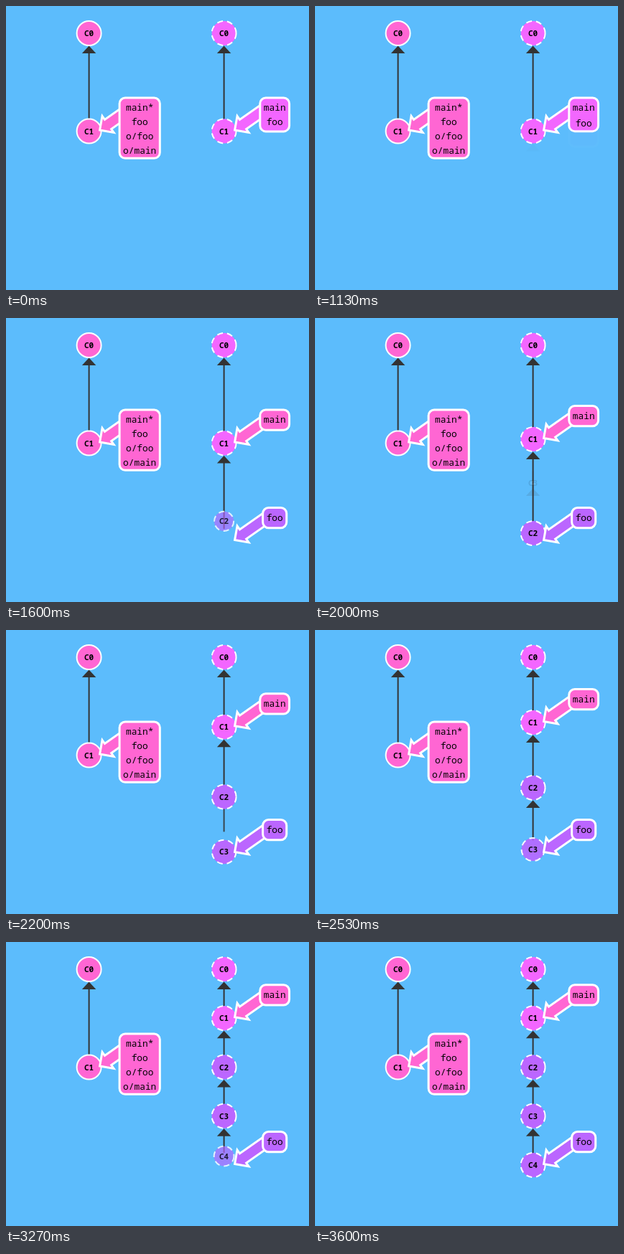
Animation, 422 px wide and 396 px high, one loop 5190 ms. Source, as an HTML page:

```html
<!DOCTYPE html>
<html lang="en">
<head>
<meta charset="utf-8">
<title>Commit tree</title>
<style>
  html, body { margin: 0; width: 100%; height: 100%; overflow: hidden; background: #5cbcfc; }
  svg { display: block; width: 422px; height: 396px; }
  text { font-family: "Noto Sans Mono", "DejaVu Sans Mono", monospace; text-anchor: middle; fill: #000; }
  .id { font-size: 11px; font-weight: bold; }
  .name { font-size: 12.83px; }
  .node { stroke: #fff; stroke-width: 2; }
  .remote { stroke-dasharray: 8 6; }
  .tag { stroke: #fff; stroke-width: 3; }
  .line { stroke: #333; stroke-width: 2; }
  .head { fill: #333; }
</style>
</head>
<body>
<svg id="stage" viewBox="0 0 422 396"></svg>
<script>
const LOOP = 5190, FPS = 15;
const LEFT = 115.6, RIGHT = 303.6, TOP = 38, R = 17;
const PINK = [255, 102, 211], MIX = [243, 102, 255], PURPLE = [187, 102, 255];
// one entry per new commit: start time, and the row gap it leads to
const BORN = [{ at: 1100, gap: 136.5 }, { at: 1904, gap: 91 }, { at: 2754, gap: 68.25 }];
const CHAR = 7.7, PAD = 5, ROW = 18.7, BOX_PAD = 9.5;

const stage = document.getElementById('stage');
const mix = (a, b, p) => a + (b - a) * p;
const clamp = v => Math.max(0, Math.min(1, v));
const rgb = c => `rgb(${c.map(Math.round)})`;
const blend = (a, b, p) => rgb(a.map((v, i) => mix(v, b[i], p)));

function set(el, attrs) {
  for (const key in attrs) el.setAttribute(key, attrs[key]);
  return el;
}
function add(tag, attrs, parent = stage) {
  return parent.appendChild(set(document.createElementNS('http://www.w3.org/2000/svg', tag), attrs));
}
function label(str, cls, x) {
  const el = add('text', { class: cls, x });
  el.textContent = str;
  return el;
}

function easeInOut(n) {
  if (n <= 0 || n >= 1) return clamp(n);
  const q = 0.48 - n / 1.04, w = Math.sqrt(0.1734 + q * q);
  const t = Math.cbrt(w - q) + Math.cbrt(-w - q) + 0.5;
  return 3 * (1 - t) * t * t + t * t * t;
}
function bounce(n) {
  const k = 7.5625, d = 2.75;
  if (n >= 1) return 1;
  if (n < 1 / d) return k * n * n;
  if (n < 2 / d) return k * (n - 1.5 / d) ** 2 + 0.75;
  if (n < 2.5 / d) return k * (n - 2.25 / d) ** 2 + 0.9375;
  return k * (n - 2.625 / d) ** 2 + 0.984375;
}

function makeEdge(x) {
  const g = add('g', {});
  const line = add('line', { class: 'line', x1: x, x2: x }, g);
  const head = add('path', { class: 'head', d: `M${x} -0.5l9.7 10.5h-19.4z` }, g);
  return (top, bottom, opacity) => {
    set(line, { y1: top + 5, y2: bottom });
    set(head, { transform: `translate(0 ${top})` });
    set(g, { opacity });
  };
}

function makeNode(x, str, fill, cls = '') {
  const circle = add('circle', { class: 'node ' + cls, cx: x, fill: rgb(fill) });
  const text = label(str, 'id', x);
  return (y, p) => {
    set(circle, { cy: y, r: R * p, opacity: p, 'fill-opacity': p });
    set(text, { y: y + 4, opacity: p });
  };
}

function makeTag(x) {
  const arrow = add('path', { class: 'tag', d: 'M0 0L14 -14V-8H63V8H14V14Z' });
  const box = add('rect', { class: 'tag', rx: 8, ry: 8 });
  return (commitY, textY, chars, rows, fill, opacity) => {
    const w = chars * CHAR + PAD * 2;
    set(arrow, { transform: `translate(${x + 15} ${commitY - 1.5}) rotate(-35)`, fill, opacity });
    set(box, {
      x: x + 70.6 - w / 2, y: textY - 14.1, width: w, height: rows * ROW + BOX_PAD, fill, opacity
    });
  };
}
const makeName = (x, str) => {
  const el = label(str, 'name', x + 70.6);
  return y => set(el, { y: y + 4.3 });
};

// local tree, which stays still
makeEdge(LEFT)(TOP + 18, 157.5, 1);
makeNode(LEFT, 'C1', PINK)(174.5, 1);
makeNode(LEFT, 'C0', PINK)(TOP, 1);
makeTag(LEFT)(174.5, 142.1, 6, 4, rgb(PINK), 1);
['main*', 'foo', 'o/foo', 'o/main'].forEach((s, i) => makeName(LEFT, s)(142.1 + 20 * i));

// remote tree, younger commits behind their parents
const edges = [4, 3, 2, 1].map(k => ({ k, draw: makeEdge(RIGHT) }));
const nodes = [4, 3, 2, 1, 0].map(k => (
  { k, draw: makeNode(RIGHT, 'C' + k, k < 2 ? MIX : PURPLE, 'remote') }
));
const mainTag = makeTag(RIGHT), mainName = makeName(RIGHT, 'main');
const fooTag = makeTag(RIGHT), fooName = makeName(RIGHT, 'foo');

function draw(t) {
  const ease = BORN.map(b => easeInOut(clamp((t - b.at) / 400)));
  const pop = BORN.map(b => bounce(clamp((t - b.at) / 800)));
  const gap = mix(mix(BORN[0].gap, BORN[1].gap, ease[1]), BORN[2].gap, ease[2]);
  const rowY = k => TOP + k * gap;
  // a newborn leaves its parent's final place
  const birthY = (k, p) => TOP + (k - 1 + p) * BORN[k - 2].gap;
  const fresh = k => k > 1 && pop[k - 2] < 1;

  for (const { k, draw } of edges) {
    if (fresh(k)) {
      const p = ease[k - 2];
      const top = p < 1 ? birthY(k, 0) : rowY(k - 1);
      draw(top + 18, birthY(k, p) - R, p);
    } else {
      draw(rowY(k - 1) + 18, rowY(k) - R, 1);
    }
  }
  for (const { k, draw } of nodes) {
    if (fresh(k)) draw(birthY(k, pop[k - 2]), pop[k - 2]);
    else draw(rowY(k), 1);
  }

  const split = ease[0], rows = 2 - split;
  mainTag(rowY(1), rowY(1) - 32.4, 4, rows, blend(MIX, PINK, split), 1);
  mainName(rowY(1) - 32.4);
  const fooY = mix(162.1, 278.6, split);
  fooTag(mix(174.5, 311, split), fooY, 4 - split, rows, blend(MIX, PURPLE, split), split);
  fooName(fooY);
}

const start = performance.now();
function tick() {
  const t = (performance.now() - start) % LOOP;
  draw(Math.floor((t + 3.4) * FPS / 1000) * 1000 / FPS);
  requestAnimationFrame(tick);
}
tick();
</script>
</body>
</html>
```
